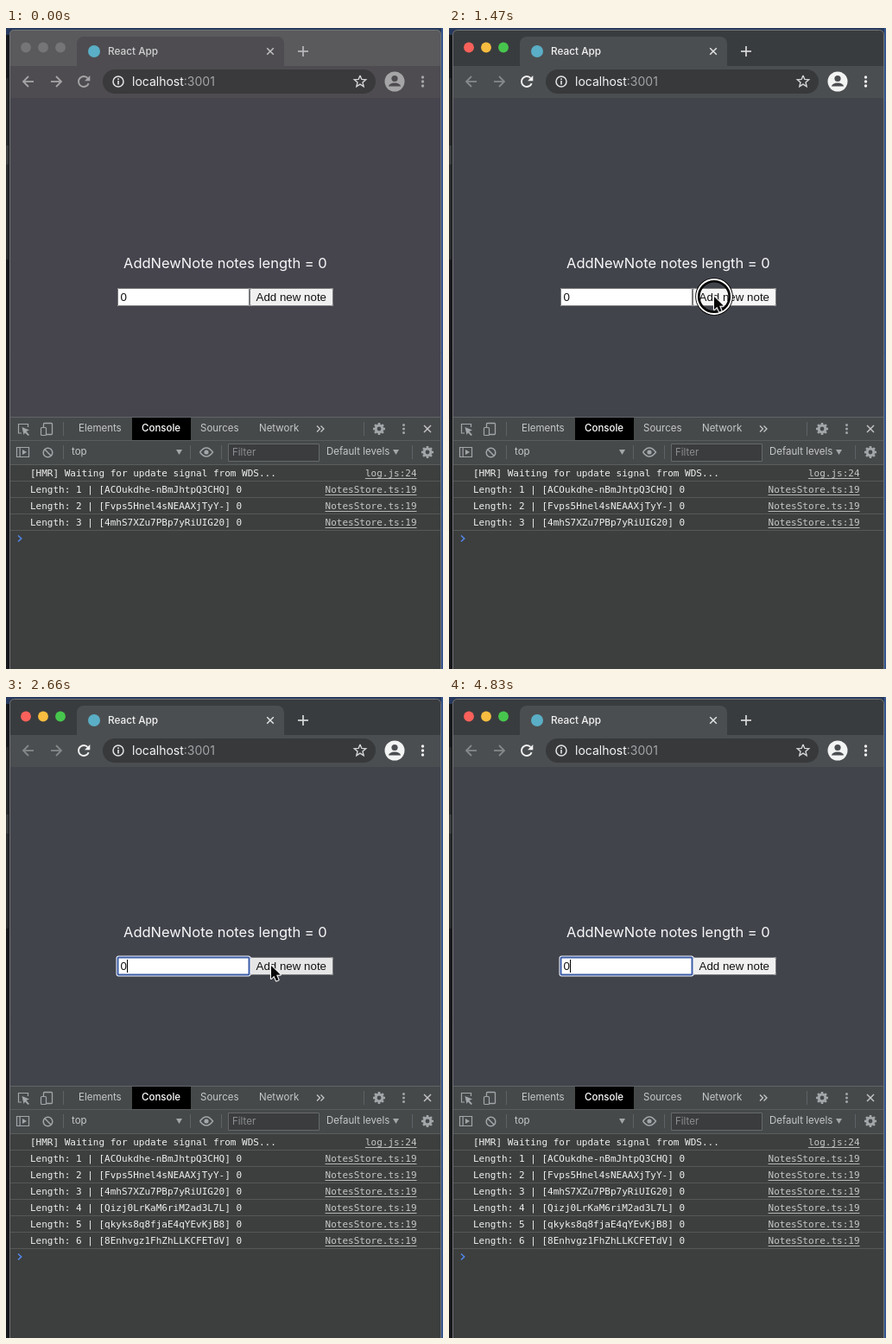
An HTML page with a canvas that plays this animation: 506 by 742 pixels, repeating every 4900 ms.

```html
<!DOCTYPE html>
<html lang="en">
<head>
<meta charset="utf-8">
<title>Notes</title>
<style>
html, body { margin: 0; width: 100%; height: 100%; overflow: hidden; background: #17181b; }
canvas { display: block; }
</style>
</head>
<body>
<canvas id="stage" width="506" height="742"></canvas>
<script>
const ctx = document.getElementById('stage').getContext('2d');
const LOOP = 4900, STEP = 70, TAU = Math.PI * 2;
const UI = 'Inter, sans-serif';
const MONO = '"DejaVu Sans Mono", monospace';
const FORM = '"Liberation Sans", Arial, sans-serif';

const ids = ['ACOukdhe-nBmJhtpQ3CHQ', 'Fvps5Hnel4sNEAAXjTyY-', '4mhS7XZu7PBp7yRiUIG20',
  'Qizj0LrKaM6riM2ad3L7L', 'qkyks8q8fjaE4qYEvKjB8', '8Enhvgz1FhZhLLKCFETdV'];

// Mouse presses: the first activates the window, the others add a note.
const clicks = [
  { down: 910, up: 1120 },
  { down: 1330, up: 1540 },
  { down: 1890, up: 2030 },
  { down: 2380, up: 2520 }
];
// Time, x, y of the pointer hot spot.
const path = [
  [70, 400, -25], [840, 304, 302], [1120, 304, 302], [1260, 307, 311],
  [2940, 307, 311], [3430, 304, 320], [3640, 304, 320], [4130, 302, 327],
  [4270, 302, 327], [4690, 400, -25]
];

function rect(x, y, w, h, color) {
  ctx.fillStyle = color;
  ctx.fillRect(x, y, w, h);
}

function round(x, y, w, h, r, color) {
  ctx.fillStyle = color;
  ctx.beginPath();
  ctx.roundRect(x, y, w, h, r);
  ctx.fill();
}

function box(x, y, w, h, r, color, width = 1) {
  ctx.strokeStyle = color;
  ctx.lineWidth = width;
  ctx.beginPath();
  ctx.roundRect(x, y, w, h, r);
  ctx.stroke();
}

function disc(x, y, r, color) {
  ctx.fillStyle = color;
  ctx.beginPath();
  ctx.arc(x, y, r, 0, TAU);
  ctx.fill();
}

function ring(x, y, r, color, width = 1.5, from = 0, to = TAU) {
  ctx.strokeStyle = color;
  ctx.lineWidth = width;
  ctx.beginPath();
  ctx.arc(x, y, r, from, to);
  ctx.stroke();
}

function trace(points) {
  ctx.beginPath();
  points.forEach(([x, y], i) => i ? ctx.lineTo(x, y) : ctx.moveTo(x, y));
}

function line(points, color, width = 1.5) {
  trace(points);
  ctx.strokeStyle = color;
  ctx.lineWidth = width;
  ctx.stroke();
}

function shape(points, color) {
  trace(points);
  ctx.closePath();
  ctx.fillStyle = color;
  ctx.fill();
}

function text(str, x, y, font, color) {
  ctx.font = font;
  ctx.fillStyle = color;
  ctx.fillText(str, x, y);
  return ctx.measureText(str).width;
}

function cross(x, y, r, color, width = 1.5) {
  line([[x - r, y - r], [x + r, y + r]], color, width);
  line([[x + r, y - r], [x - r, y + r]], color, width);
}

function dots(x, y, gap, r, color) {
  for (let i = -1; i < 2; i++) disc(x, y + i * gap, r, color);
}

function gear(x, y, color) {
  for (let i = 0; i < 8; i++) {
    const a = i * TAU / 8, c = Math.cos(a), s = Math.sin(a);
    line([[x + c * 4, y + s * 4], [x + c * 7, y + s * 7]], color, 2.6);
  }
  ring(x, y, 3.9, color, 3);
}

function arrow(x, y, dir, color) {
  line([[x - 6 * dir, y], [x + 6 * dir, y]], color, 1.8);
  line([[x, y - 6], [x + 6 * dir, y], [x, y + 6]], color, 1.8);
}

function star(x, y, r, color) {
  const points = Array.from({ length: 11 }, (_, i) => {
    const a = -Math.PI / 2 + i * Math.PI / 5, d = i % 2 ? r * 0.45 : r;
    return [x + d * Math.cos(a), y + d * Math.sin(a)];
  });
  line(points, color, 1.4);
}

function desktop() {
  rect(0, 0, 506, 742, '#17181b');
  rect(0, 0, 506, 8, '#27395c');
  rect(504, 0, 2, 742, '#34558f');
  rect(0, 8, 3, 50, '#17181b');
  rect(0, 58, 3, 80, '#27282a');
  rect(0, 136, 3, 22, '#3c3d3f');
  rect(0, 158, 3, 110, '#2a2b2d');
}

function browser(active) {
  const bar = active ? '#4b4e50' : '#4e4c50';
  const bright = active ? '#f2f3f3' : '#a5a4a6';
  const dim = active ? '#85888a' : '#a5a4a6';
  round(4, 2, 500, 760, [5, 5, 0, 0], active ? '#393c3e' : '#5a595c');

  const lights = active ? ['#f9615a', '#f8bd40', '#47c64d'] : Array(3).fill('#757477');
  lights.forEach((color, i) => disc(23 + i * 20, 22.5, 5.9, color));

  round(82, 10, 240, 40, [8, 8, 0, 0], bar);
  rect(4, 44, 500, 37, bar);
  disc(102, 27, 7, '#5aaec6');
  text('React App', 118, 27, '500 11.8px ' + UI, active ? '#f0f1f1' : '#d0d0d1');
  cross(306, 27, 3.8, active ? '#e0e1e2' : '#c0bfc1');
  const plus = active ? '#d8dadb' : '#bab9bc';
  line([[338, 27], [350, 27]], plus, 1.7);
  line([[344, 21], [344, 33]], plus, 1.7);

  arrow(26, 62, -1, dim);
  arrow(58, 62, 1, dim);
  ring(90, 62, 6, bright, 1.9, 0.35, TAU - 0.75);
  shape([[97.3, 55], [97.3, 61.2], [91, 61.2]], bright);

  round(112, 48, 316, 28, 14, active ? '#37393b' : '#3a393b');
  ring(130, 62, 6, '#e4e5e6', 1.5);
  rect(129.2, 61, 1.6, 4.5, '#e4e5e6');
  rect(129.2, 58.3, 1.6, 1.7, '#e4e5e6');
  const host = text('localhost', 146, 62.4, '14px ' + UI, '#f5f5f6');
  text(':3001', 146 + host, 62.4, '14px ' + UI, '#a2a5a7');
  star(410, 62, 7, '#d4d6d8');

  disc(450, 62, 11.5, bright);
  disc(450, 58.5, 3.6, bar);
  ctx.fillStyle = bar;
  ctx.beginPath();
  ctx.ellipse(450, 67.5, 7, 4, 0, Math.PI, TAU);
  ctx.fill();
  dots(482.5, 62, 5, 1.7, bright);
}

function page(active, focused, buttonColor) {
  rect(4, 81, 500, 369, active ? '#42444c' : '#46454e');
  text('AddNewNote notes length = 0', 136, 272.6, '16.5px ' + UI, '#f7f7f8');

  round(282, 301, 97, 21, 2, buttonColor);
  box(282.5, 301.5, 96, 20, 2, '#77787a');
  text('Add new note', 289.5, 312, '13.333px ' + FORM, '#111111');

  if (focused) round(127.5, 299.5, 156, 24, 3, '#f4f6fa');
  rect(129, 301, 153, 21, '#ffffff');
  if (focused) box(129.5, 301.5, 152, 20, 1, '#3b5ca6', 2);
  else box(129.5, 301.5, 152, 20, 0, '#77787a');
  text('0', 132.5, 312, '13.333px ' + FORM, '#151515');
  if (focused) rect(140, 304, 1, 15, '#000000');
}

function inspector() {
  const icon = '#a3a6a8', label = '#c6c8c9';
  rect(4, 450, 500, 292, '#3d3f3e');
  rect(4, 450, 500, 55, '#46494a');
  rect(4, 450, 500, 1, '#616466');
  rect(4, 477, 500, 1, '#5a5d5e');
  rect(4, 505, 500, 1, '#5a5d5e');

  line([[18, 469], [14.5, 469], [14.5, 458.5], [25.5, 458.5], [25.5, 462]], icon, 1.2);
  shape([[18.5, 462], [27, 465.5], [23.5, 467], [27, 471], [25.5, 472], [22, 468.5], [20.5, 471]], icon);
  box(43.5, 457.5, 10, 13, 1, icon, 1.3);
  round(40, 462, 7, 10, 1, '#46494a');
  box(40.5, 462.5, 6, 9, 1, icon, 1.2);
  rect(66, 456, 1, 16, '#5f6264');

  rect(146, 451, 68, 26, '#000000');
  const tabs = [['Elements', 84], ['Console', 157], ['Sources', 225], ['Network', 293]];
  for (const [name, x] of tabs) {
    const current = name === 'Console';
    text(name, x, 464, (current ? '500 ' : '') + '11.5px ' + UI, current ? '#ffffff' : label);
  }
  for (const x of [360, 364.5]) line([[x, 460.5], [x + 3.5, 464], [x, 467.5]], label, 1.3);
  rect(414, 456, 1, 16, '#5f6264');
  gear(432, 464, icon);
  dots(460.5, 464, 4.5, 1.5, icon);
  cross(488, 464, 4, '#c3c5c6', 1.4);

  box(12.5, 485.5, 14, 11, 0, icon, 1.2);
  rect(15.5, 486, 1.2, 10, icon);
  shape([[19, 488], [24, 491], [19, 494]], icon);
  ring(48.5, 491.5, 5.3, icon, 1.5);
  line([[44.8, 487.8], [52.2, 495.2]], icon, 1.5);
  rect(66, 483, 1, 16, '#5f6264');
  text('top', 76, 491, '11.5px ' + UI, label);
  shape([[197, 488], [204, 488], [200.5, 494]], icon);
  rect(213, 483, 1, 16, '#5f6264');
  ctx.strokeStyle = icon;
  ctx.lineWidth = 1.5;
  ctx.beginPath();
  ctx.moveTo(224.5, 491);
  ctx.quadraticCurveTo(232, 481, 239.5, 491);
  ctx.quadraticCurveTo(232, 501, 224.5, 491);
  ctx.stroke();
  disc(232, 491, 2.6, icon);
  rect(249, 483, 1, 16, '#5f6264');
  rect(257, 481, 106, 21, '#3a3c3d');
  box(257.5, 481.5, 105, 20, 0, '#66696b');
  text('Filter', 262, 491.5, '11.5px ' + UI, '#8b8e90');
  text('Default levels', 371, 491, '11.5px ' + UI, label);
  shape([[448, 488], [455, 488], [451.5, 494]], icon);
  rect(470, 483, 1, 16, '#5f6264');
  gear(488, 491, icon);
}

function logRow(index, message, origin) {
  const y = 516 + index * 19;
  text(message, 28, y, '11px ' + MONO, '#eeefee');
  ctx.font = '11px ' + MONO;
  const width = ctx.measureText(origin).width;
  text(origin, 475.5 - width, y, '11px ' + MONO, '#c5c7c6');
  rect(475.5 - width, y + 5, width, 1, '#b5b7b6');
  rect(4, y + 8, 500, 1, '#555857');
}

function consoleLog(count) {
  logRow(0, '[HMR] Waiting for update signal from WDS...', 'log.js:24');
  ids.slice(0, count).forEach((id, i) =>
    logRow(i + 1, `Length: ${i + 1} | [${id}] 0`, 'NotesStore.ts:19'));
  const y = 591 + (count - 3) * 19;
  line([[14, y - 3.5], [17.7, y], [14, y + 3.5]], '#5286e8', 1.6);
}

function pointerAt(t) {
  const end = path.length - 1;
  if (t <= path[0][0] || t >= path[end][0]) return null;
  const i = path.findIndex(p => p[0] > t);
  const [t0, x0, y0] = path[i - 1], [t1, x1, y1] = path[i];
  const k = (t - t0) / (t1 - t0), e = k * k * (3 - 2 * k);
  return { x: x0 + (x1 - x0) * e, y: y0 + (y1 - y0) * e };
}

function inside(p, x, y, w, h) {
  return p && p.x >= x && p.x < x + w && p.y >= y && p.y < y + h;
}

function arrowCursor(x, y) {
  const outline = [[0, 0], [0, 15], [3.4, 11.8], [6, 17.6], [8.6, 16.5], [6.1, 10.8], [10.8, 10.6]];
  const points = outline.map(([dx, dy]) => [x + dx, y + dy]);
  ctx.lineJoin = 'round';
  trace(points);
  ctx.closePath();
  ctx.strokeStyle = '#f5f5f5';
  ctx.lineWidth = 2.2;
  ctx.stroke();
  shape(points, '#080808');
  ctx.lineJoin = 'miter';
}

function textCursor(x, y) {
  for (const [color, width] of [['#e8e8e8', 3], ['#111111', 1.2]]) {
    line([[x - 3.5, y - 8], [x, y - 6], [x + 3.5, y - 8]], color, width);
    line([[x, y - 6], [x, y + 6]], color, width);
    line([[x - 3.5, y + 8], [x, y + 6], [x + 3.5, y + 8]], color, width);
    line([[x - 2.5, y + 2], [x + 2.5, y + 2]], color, width);
  }
}

function pointer(p, press, t) {
  if (!p) return;
  if (press) {
    const r = 8 + 12 * Math.min(1, (t - press.down) / 105);
    ring(p.x, p.y, r - 0.6, '#050505', 4.8);
    ring(p.x, p.y, r - 2.6, '#050505', 2);
    ring(p.x, p.y, r, '#ffffff', 1.8);
  }
  const overText = inside(p, 136, 260, 236, 43) || inside(p, 129, 301, 153, 21);
  if (overText) textCursor(p.x, p.y);
  else arrowCursor(p.x, p.y);
}

function draw(t) {
  const active = t >= clicks[0].down;
  const added = clicks.slice(1).filter(c => t >= c.up).length;
  const press = clicks.find(c => t >= c.down && t < c.up);
  const p = pointerAt(t);
  const hover = inside(p, 282, 303, 97, 19);
  const buttonColor = !hover ? '#f0f0f0' : press ? '#f6f6f6' : '#e6e6e6';

  ctx.textBaseline = 'middle';
  desktop();
  browser(active);
  page(active, added > 0, buttonColor);
  inspector();
  consoleLog(3 + added);
  box(4.5, 2.5, 499, 760, [5, 5, 0, 0], '#717476');
  pointer(p, press, t);
}

function tick() {
  const t = performance.now() % LOOP;
  draw(Math.floor(t / STEP) * STEP);
  requestAnimationFrame(tick);
}
tick();
</script>
</body>
</html>
```
